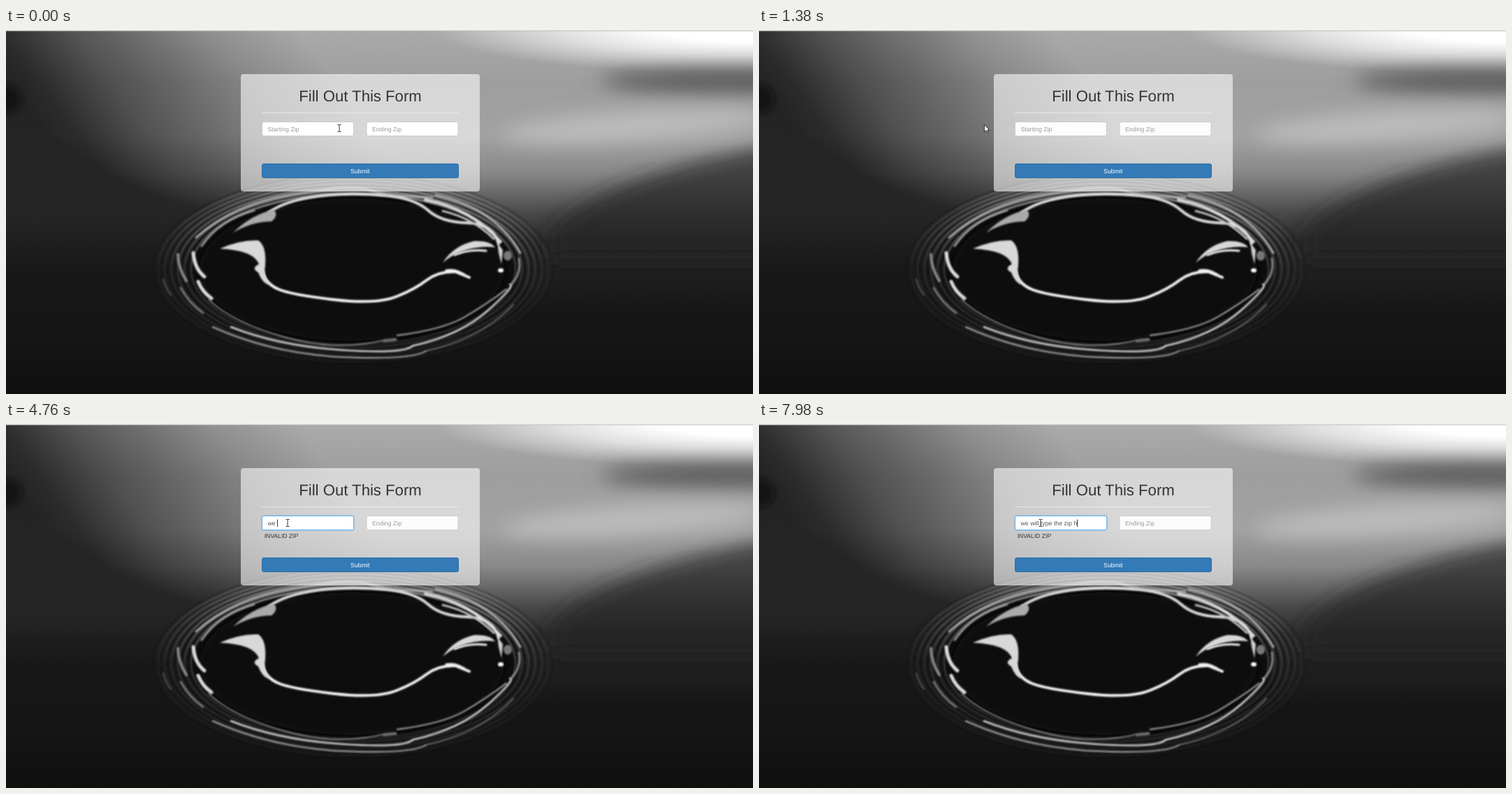
An HTML page for the animation above (8000 ms loop, 1069x524 px).

```html
<!DOCTYPE html>
<html lang="en">
<head>
<meta charset="utf-8">
<title>Zip form</title>
<style>
  html, body { margin: 0; width: 100%; height: 100%; overflow: hidden; background: #fdfdfd; }
  svg { display: block; width: 1069px; height: 524px; }
  text { font: 8.8px "Liberation Sans", Arial, sans-serif; text-rendering: geometricPrecision; white-space: pre; }
  .hint { fill: #999; }
  .field { fill: #fff; stroke: #ccc; }
  .reloaded .field { fill: #fcfcfc; }
  .field.focus { fill: #fff; stroke: #66afe9; filter: drop-shadow(0 0 1.3px rgba(102, 175, 233, .8)); }
  .line path { fill: none; stroke-linecap: round; }
  #photo { isolation: isolate; }
  .floor { mix-blend-mode: lighten; }
</style>
</head>
<body>
<svg id="stage" viewBox="0 0 1069 524">
  <defs>
    <linearGradient id="sky" x2="0" y2="1">
      <stop offset="0" stop-color="#aaa"/>
      <stop offset=".14" stop-color="#9e9e9e"/>
      <stop offset=".29" stop-color="#a2a2a2"/>
      <stop offset=".39" stop-color="#888"/>
      <stop offset=".5" stop-color="#4a4a4a"/>
      <stop offset=".58" stop-color="#292929"/>
      <stop offset=".77" stop-color="#161616"/>
      <stop offset="1" stop-color="#0f0f0f"/>
    </linearGradient>
    <linearGradient id="shade" gradientUnits="userSpaceOnUse" x1="-73" y1="52" x2="277" y2="-198">
      <stop offset="0" stop-opacity=".84"/>
      <stop offset=".195" stop-opacity=".73"/>
      <stop offset=".386" stop-opacity=".5"/>
      <stop offset=".574" stop-opacity=".33"/>
      <stop offset=".763" stop-opacity=".15"/>
      <stop offset="1" stop-opacity="0"/>
    </linearGradient>
    <linearGradient id="floor" x2="0" y2="1">
      <stop offset="0" stop-color="#222"/>
      <stop offset=".5" stop-color="#262626"/>
      <stop offset=".66" stop-color="#181818"/>
      <stop offset=".85" stop-color="#151515"/>
      <stop offset="1" stop-color="#0f0f0f"/>
    </linearGradient>
    <radialGradient id="glare">
      <stop offset=".3" stop-color="#fff"/>
      <stop offset=".6" stop-color="#fff" stop-opacity=".65"/>
      <stop offset="1" stop-color="#fff" stop-opacity="0"/>
    </radialGradient>
    <linearGradient id="ripple" x2="0" y2="1">
      <stop offset="0" stop-color="#c4c4c4"/>
      <stop offset=".2" stop-color="#888"/>
      <stop offset=".5" stop-color="#484848"/>
      <stop offset="1" stop-color="#303030"/>
    </linearGradient>
    <filter id="wide" x="-50%" y="-50%" width="200%" height="200%"><feGaussianBlur stdDeviation="14"/></filter>
    <filter id="mid" x="-20%" y="-20%" width="140%" height="140%"><feGaussianBlur stdDeviation="5"/></filter>
    <filter id="soft" x="-10%" y="-10%" width="120%" height="120%"><feGaussianBlur stdDeviation="1.1"/></filter>
  </defs>

  <g id="photo">
    <rect y="4" width="1069" height="520" fill="url(#sky)"/>
    <rect y="4" width="1069" height="520" fill="url(#shade)"/>
    <ellipse cx="1069" cy="0" rx="460" ry="66" fill="url(#glare)"/>
    <g filter="url(#wide)">
      <ellipse cx="1040" cy="76" rx="190" ry="18" fill="#5c5c5c"/>
      <ellipse cx="900" cy="140" rx="190" ry="20" fill="#bdbdbd" transform="rotate(-4 900 140)"/>
      <path d="M780 290Q860 208 1110 166V330H780Z" fill="#222" opacity=".7"/>
    </g>
    <rect class="floor" y="4" width="1069" height="520" fill="url(#floor)"/>
    <ellipse cx="0" cy="102" rx="22" ry="20" fill="#101010" opacity=".7" filter="url(#mid)"/>
    <ellipse cx="497" cy="345" rx="240" ry="114" fill="#101010" filter="url(#mid)"/>
    <g id="rings" fill="none" filter="url(#soft)"></g>
    <ellipse cx="495" cy="346" rx="218" ry="102" fill="#0a0a0a" filter="url(#mid)"/>

    <g class="line" filter="url(#soft)">
      <g stroke="#dcdcdc" stroke-width="3">
        <path d="M376 264Q400 247 445 241T545 240Q585 244 604 261T660 279T705 309" stroke-width="4"/>
        <path d="M600 246Q665 258 708 306" stroke-width="4"/>
        <path d="M625 262Q668 272 698 302" stroke="#bbb"/>
        <path d="M280 312Q305 275 355 261" stroke="#999"/>
        <path d="M272 300Q325 252 410 238T520 232T610 243" stroke="#aaa"/>
        <path d="M615 239Q700 258 736 322" stroke="#aaa"/>
        <path d="M268 322Q270 345 284 356" stroke-width="5"/>
        <path d="M275 363Q281 378 294 387" stroke-width="5"/>
        <path d="M246 324Q246 342 258 362" stroke="#888" stroke-width="4"/>
        <path d="M250 372Q262 394 282 408" stroke="#777"/>
        <path d="M225 360Q229 374 236 382" stroke="#444"/>
        <path d="M734 330Q738 350 724 366" stroke="#888"/>
      </g>
      <g stroke="#cfcfcf" stroke-width="2">
        <path d="M290 389Q325 422 400 443T545 446Q562 444 558 447L540 449" stroke="#999" stroke-width="1.5"/>
        <path d="M322 428Q390 455 480 461T582 455" stroke-width="2.5"/>
        <path d="M582 455Q650 440 690 404T721 367" stroke-width="2.5"/>
        <path d="M560 440Q625 432 656 414T716 374" stroke="#aaa"/>
        <path d="M296 428Q380 466 480 471T602 462" stroke="#aaa"/>
        <path d="M602 462Q680 445 726 396" stroke="#666"/>
      </g>
      <path d="M367 348Q371 366 390 374T470 389T560 384Q585 374 602 361T643 349L663 357" stroke="#f4f4f4" stroke-width="4"/>
      <path d="M642 325Q662 316 687 319M630 347Q645 344 660 356" stroke="#eee" stroke-width="3"/>
    </g>
    <g filter="url(#soft)">
      <path d="M306 316Q335 303 361 304Q373 312 371 340Q368 352 376 368Q366 364 361 350Q350 344 362 338Q354 318 306 316Z" fill="#d8d8d8"/>
      <path d="M325 293Q350 268 383 260Q391 268 380 277Q352 277 325 293Z" fill="#aaa"/>
      <path d="M625 336Q640 312 670 305Q692 304 700 314Q676 311 652 320Q638 325 625 336Z" fill="#d8d8d8"/>
      <ellipse cx="718" cy="326" rx="6" ry="7" fill="#777"/>
      <ellipse cx="708" cy="347" rx="4" ry="3" fill="#fff"/>
      <path d="M703 307L711 318L709 338L705 322Z" fill="#ccc"/>
    </g>
    <rect x="336" y="66" width="342" height="168" rx="4" fill="#fff" fill-opacity=".58"/>
  </g>

  <rect width="1069" height="4" fill="#f1f1f1"/>
  <path d="M0 4H1069" stroke="#bcbcbc"/>

  <text x="507" y="105" text-anchor="middle" fill="#333" style="font-size:22.15px">Fill Out This Form</text>
  <path d="M366 121.5H648" stroke="#eee" stroke-opacity=".8"/>
  <rect id="start" class="field" x="366.5" y="134.5" width="131" height="20" rx="2.5"/>
  <rect class="field" x="516" y="134.5" width="131" height="20" rx="2.5"/>
  <text id="hint" class="hint" x="374.5" y="148">Starting Zip</text>
  <text class="hint" x="524" y="148">Ending Zip</text>
  <text id="typed" x="374.5" y="148" fill="#555" xml:space="preserve"></text>
  <path id="caret" d="M0 139.5V150" stroke="#333"/>
  <text id="note" x="369.7" y="166" fill="#333" style="font-size:8.6px"></text>
  <rect x="366.5" y="194.5" width="281" height="20" rx="2.5" fill="#337ab7" stroke="#2e6da4"/>
  <text x="506.8" y="208" text-anchor="middle" fill="#fff">Submit</text>

  <path id="arrow" d="M.5 .5V10.8L2.9 8.6L4.5 12.2L6.2 11.4L4.6 8H7.8Z" fill="#fff" stroke="#222" stroke-width=".9"/>
  <path id="beam" d="M-2.5 -5H-.5L0 -4.5L.5 -5H2.5M0 -4.5V4.5M-2.5 5H-.5L0 4.5L.5 5H2.5" fill="none" stroke="#333"/>
</svg>
<script>
const LOOP = 8000;
const PHRASE = 'we will type the zip h';
const BAD = 'INVALID ZIP';
const $ = id => document.getElementById(id);

// [time, pointer shape, x, y]
const pointer = [
  [0, 'beam', 477, 143.5], [140, 'beam', 491, 143.5],
  [360, 'arrow', 512, 145], [480, 'arrow', 500, 145],
  [630, 'beam', 453, 151], [780, 'arrow', 440, 163],
  [900, 'arrow', 405, 172], [1020, 'arrow', 375, 175],
  [1140, 'arrow', 360, 172], [1260, 'arrow', 284, 148],
  [1380, 'arrow', 322, 138], [1610, 'beam', 398, 144],
  [1830, 'beam', 403, 147.5], [1960, 'beam', 403, 144.5]
];
// [time, characters typed]
const keys = [
  [0, 0], [4450, 1], [4610, 2], [4760, 3], [4900, 4], [5030, 5], [5150, 6],
  [5270, 7], [5410, 8], [6220, 9], [6470, 10], [6610, 11], [6730, 12], [6880, 13],
  [7030, 15], [7160, 16], [7310, 17], [7430, 18], [7710, 19], [7840, 20], [7980, 22]
];
const notes = [
  [0, ''], [4450, BAD], [5030, ''], [5150, BAD],
  [5410, 'No place found for this zip'], [5660, BAD]
];
const blink = [[0, 0], [1960, 1], [2550, 0], [3090, 1], [3600, 0], [4180, 1]];

const at = (track, t) => track.findLast(step => step[0] <= t);
const show = (id, on) => { $(id).style.display = on ? '' : 'none'; };

function ring(rx, ry, stroke, width, opacity) {
  const el = document.createElementNS('http://www.w3.org/2000/svg', 'ellipse');
  const attrs = { cx: 497, cy: 345, rx, ry, stroke, 'stroke-width': width, opacity };
  for (const name in attrs) el.setAttribute(name, attrs[name]);
  $('rings').append(el);
}

for (let k = 0; k < 6; k++) {
  const rx = 232 + 9.5 * k, ry = 108 + 4.8 * k;
  ring(rx + 4.5, ry + 2.4, '#141414', 3.2, 0.85 - 0.11 * k);
  ring(rx, ry, 'url(#ripple)', 2.2, 0.8 - 0.11 * k);
}

function draw(t) {
  show('photo', t < 1260 || t >= 1380);
  $('stage').classList.toggle('reloaded', t >= 1260);
  $('start').classList.toggle('focus', t >= 2110);

  const count = at(keys, t)[1];
  $('typed').textContent = PHRASE.slice(0, count);
  show('hint', !count);
  $('note').textContent = at(notes, t)[1];

  const end = count ? $('typed').getComputedTextLength() : 0;
  $('caret').setAttribute('transform', `translate(${Math.floor(374.5 + end) + 0.5})`);
  show('caret', at(blink, t)[1]);

  const [, shape, x, y] = at(pointer, t);
  show('arrow', shape === 'arrow');
  show('beam', shape === 'beam');
  $(shape).setAttribute('transform', `translate(${x} ${y})`);
}

const origin = performance.now();
function tick() {
  draw((performance.now() - origin) % LOOP);
  requestAnimationFrame(tick);
}
tick();
</script>
</body>
</html>
```
